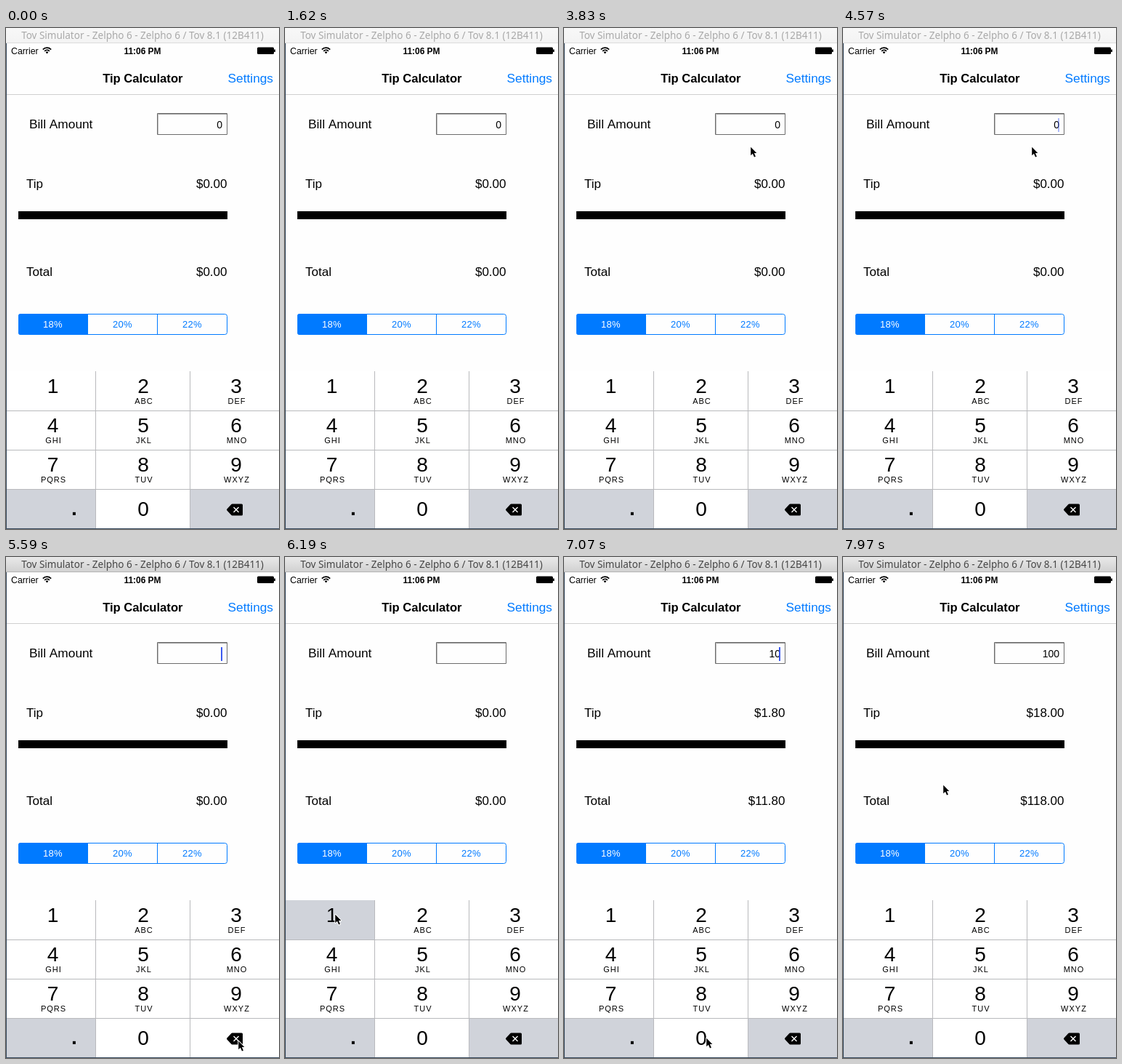
Animation of 376x689 px, one loop 8000 ms. Source, as an HTML page with a canvas:

```html
<!DOCTYPE html>
<html lang="en">
<head>
<meta charset="utf-8">
<title>Tip Calculator</title>
<style>
html, body { margin: 0; width: 376px; height: 689px; overflow: hidden; background: #fff; }
canvas { display: block; width: 376px; height: 689px; }
</style>
</head>
<body>
<canvas id="stage" width="376" height="689"></canvas>
<script>
const ctx = document.getElementById('stage').getContext('2d');
const LOOP = 8000, STEP = 147.2;
const SANS = '"Liberation Sans", Arial, sans-serif';
const BLUE = '#007aff', GREY = '#d0d3da', LINE = '#b9babd';

const ENTER = 20, ACTIVATE = 36;

const taps = [
  { key: 'del', down: 37, up: 39 },
  { key: '1', down: 42, up: 43 },
  { key: '0', down: 47, up: 48 },
  { key: '0', down: 49, up: 50 }
];

const moves = [
  { from: 20, to: 21, x: 178, y: 127 },
  { from: 23, to: 27, x: 271, y: 169 },
  { from: 28, to: 31, x: 259, y: 162 },
  { from: 31, to: 36, x: 319, y: 664 },
  { from: 38, to: 41, x: 68, y: 490 },
  { from: 43, to: 44, x: 229, y: 641 },
  { from: 44, to: 46, x: 195, y: 660 },
  { from: 52, to: 54, x: 137, y: 312 }
];

const clamp = v => Math.min(1, Math.max(0, v));
const ease = v => v * v * (3 - 2 * v);

// Delete acts when pressed, digits when released.
function fieldAt(n) {
  let bill = '0', edited = .3;
  for (const { key, down, up } of taps) {
    const t = key === 'del' ? down : up;
    if (n < t) break;
    bill = key === 'del' ? bill.slice(0, -1) : bill + key;
    edited = t;
  }
  return { bill, caret: caretAlpha(n - edited) };
}

function caretAlpha(since) {
  const phase = (since + .3) % 6.9;
  return phase < 1 ? clamp(phase / .3) : clamp((4 - phase) / 1.4);
}

function pointerAt(n) {
  let x = 205, y = 676;
  for (const m of moves) {
    const f = ease(clamp((n - m.from) / (m.to - m.from)));
    x += (m.x - x) * f;
    y += (m.y - y) * f;
  }
  return [Math.round(x), Math.round(y)];
}

function rect(x, y, w, h, color) {
  ctx.fillStyle = color;
  ctx.fillRect(x, y, w, h);
}

function text(str, x, y, size, { color = '#000', align = 'left', weight = '', font = SANS, gap = 0 } = {}) {
  ctx.font = `${weight} ${size}px ${font}`;
  ctx.letterSpacing = gap + 'px';
  ctx.textAlign = align;
  ctx.fillStyle = color;
  ctx.fillText(str, x, y);
}

function poly(points) {
  ctx.beginPath();
  for (const [x, y] of points) ctx.lineTo(x, y);
  ctx.closePath();
}

function drawTitleBar(active) {
  const g = ctx.createLinearGradient(0, 0, 0, 21);
  g.addColorStop(0, active ? '#e9e9e9' : '#f8f8f8');
  g.addColorStop(1, active ? '#d0d0d0' : '#f3f3f3');
  rect(0, 0, 376, 21, g);
  rect(0, 20, 376, 1, active ? '#b4b4b4' : '#dcdcdc');
  text('Tov Simulator - Zelpho 6 - Zelpho 6 / Tov 8.1 (12B411)', 188, 15, 13.5,
    { color: active ? '#464646' : '#a9a9a9', align: 'center', font: '"Noto Sans", "Open Sans", sans-serif' });
}

function drawStatusBar() {
  text('Carrier', 7, 36, 12.3);
  text('11:06 PM', 188, 36, 11.9, { weight: 'bold', align: 'center' });

  // wifi
  const fan = [-Math.PI * .76, -Math.PI * .24];
  ctx.strokeStyle = ctx.fillStyle = '#000';
  ctx.lineWidth = 1.7;
  for (const r of [4.6, 7.8]) {
    ctx.beginPath();
    ctx.arc(56.5, 35, r, ...fan);
    ctx.stroke();
  }
  ctx.beginPath();
  ctx.moveTo(56.5, 35.5);
  ctx.arc(56.5, 35, 2.5, ...fan);
  ctx.fill();

  // battery
  ctx.beginPath();
  ctx.roundRect(346, 26.5, 23, 9.5, 1.5);
  ctx.fill();
  rect(369, 29.5, 2, 3.5, '#222');
}

function drawForm({ bill, caret }) {
  text('Tip Calculator', 188.3, 75, 16.6, { weight: 'bold', align: 'center' });
  text('Settings', 368, 75, 17.3, { color: BLUE, align: 'right' });
  rect(1, 91, 375, 1, '#cfcfd0');

  text('Bill Amount', 32, 138, 17.3);
  ctx.lineWidth = 1;
  ctx.strokeStyle = '#6c6c6c';
  ctx.strokeRect(208.5, 117.5, 96, 29);
  rect(209, 118, 95, 1, '#999');
  rect(209, 118, 1, 28, '#bbb');
  text(bill, 298, 138, 14, { align: 'right' });
  ctx.globalAlpha = caret;
  rect(296, 124, 2, 19, '#3d5bf0');
  ctx.globalAlpha = 1;

  const amount = Number(bill), tip = amount * .18;
  const money = v => '$' + v.toFixed(2);
  text('Tip', 28, 220, 17);
  text(money(tip), 304.5, 220, 17, { align: 'right' });
  rect(17, 252, 288, 11, '#000');
  text('Total', 28, 341, 17);
  text(money(amount + tip), 304.5, 341, 17, { align: 'right' });
}

function drawSegments() {
  ctx.fillStyle = ctx.strokeStyle = BLUE;
  ctx.beginPath();
  ctx.roundRect(17, 393, 96, 29, [3, 0, 0, 3]);
  ctx.fill();
  ctx.lineWidth = 1;
  ctx.beginPath();
  ctx.roundRect(17.5, 393.5, 287, 28, 3);
  ctx.stroke();
  rect(208, 393, 1, 29, BLUE);
  ['18%', '20%', '22%'].forEach((s, i) =>
    text(s, 64.5 + i * 96, 412, 13, { color: i ? BLUE : '#fff', align: 'center', gap: .3 }));
}

function drawDelete() {
  // same colour stroke rounds the corners
  poly([[305.5, 662.5], [311.5, 656], [324.5, 656], [324.5, 669], [311.5, 669]]);
  ctx.fillStyle = ctx.strokeStyle = '#000';
  ctx.lineJoin = 'round';
  ctx.lineWidth = 3;
  ctx.fill();
  ctx.stroke();
  ctx.strokeStyle = '#fff';
  ctx.lineWidth = 1.4;
  ctx.beginPath();
  for (const d of [-3.5, 3.5]) {
    ctx.moveTo(317 - d, 659);
    ctx.lineTo(317 + d, 666);
  }
  ctx.stroke();
}

function drawKeypad(down) {
  const edge = [1, 124, 254, 376], center = [64.5, 189, 317];
  const keys = ['1', '2', '3', '4', '5', '6', '7', '8', '9', '.', '0', 'del'];
  const letters = ['', 'ABC', 'DEF', 'GHI', 'JKL', 'MNO', 'PQRS', 'TUV', 'WXYZ'];
  keys.forEach((key, i) => {
    const col = i % 3, y = 472 + Math.floor(i / 3) * 54;
    const grey = (key === '.' || key === 'del') !== (key === down);
    rect(edge[col], y, edge[col + 1] - edge[col], 54, grey ? GREY : '#fff');
    if (key === 'del') drawDelete();
    else if (key === '.') text('.', 94, 669.5, 28, { weight: 'bold', align: 'center' });
    else text(key, center[col], key === '0' ? 671 : y + 30, 28, { align: 'center' });
    if (letters[i]) text(letters[i], center[col] + 1, y + 45, 11, { align: 'center', gap: 1 });
  });
  for (const y of [526, 580, 634]) rect(1, y, 375, 1, LINE);
  for (const x of [123, 253]) rect(x, 472, 1, 216, LINE);
}

function drawPointer(x, y) {
  ctx.save();
  ctx.translate(x, y);
  poly([[1.2, 1.8], [1.2, 13.2], [3.9, 10.8], [6, 15.6], [7.9, 14.8], [5.9, 10.1], [9.3, 10.1]]);
  ctx.lineJoin = 'round';
  ctx.strokeStyle = '#fff';
  ctx.lineWidth = 2;
  ctx.stroke();
  ctx.fillStyle = '#000';
  ctx.fill();
  ctx.restore();
}

function draw(time) {
  const n = Math.floor((time % LOOP) / STEP + .06);
  const tap = taps.find(t => n >= t.down && n < t.up);
  rect(0, 0, 376, 689, '#fefefe');
  drawTitleBar(n >= ACTIVATE);
  drawStatusBar();
  drawForm(fieldAt(n));
  drawSegments();
  drawKeypad(tap && tap.key);

  // desktop showing along the window edge
  rect(0, 21, 1, 668, '#3c4f63');
  rect(0, 688, 376, 1, '#3c4f63');

  if (n >= ENTER) drawPointer(...pointerAt(n));
}

const start = performance.now();
function tick() {
  draw(performance.now() - start);
  requestAnimationFrame(tick);
}
tick();
</script>
</body>
</html>
```
